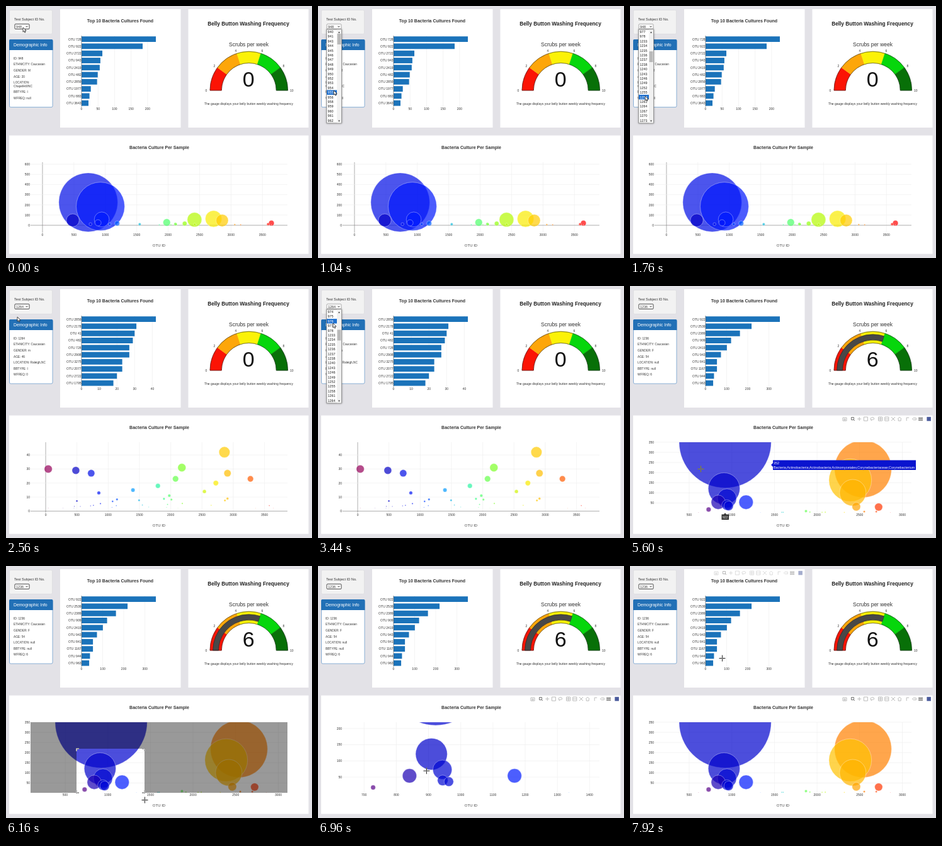
Recreate the animation shown at these times as an HTML page with a canvas. Size 486 by 400 pixels, loop 8000 ms.

```html
<!DOCTYPE html>
<html lang="en">
<head>
<meta charset="utf-8">
<title>Bacteria dashboard</title>
<style>
html, body { margin: 0; width: 100%; height: 100%; overflow: hidden; background: #e3e2e7; }
canvas { display: block; width: 486px; height: 400px; }
</style>
</head>
<body>
<canvas id="stage" width="486" height="400"></canvas>
<script>
const ctx = document.getElementById('stage').getContext('2d');
const LOOP = 8000;
const PLOT = { left: 39, right: 447, top: 248, bottom: 360 };
const BARS = { left: 120, top: 47, bottom: 160, longest: 118 };
const DRAG = { x: 112, y: 290, start: 5720, end: 6400 };
const RADIUS = 0.2078; // bubble radius per count

const lerp = (a, b, p) => a + (b - a) * p;
const clamp = (v, lo, hi) => Math.max(lo, Math.min(hi, v));
const smooth = p => p * p * (3 - 2 * p);
const random = n => Math.abs(Math.sin(n * 12.9898) * 43758.5453) % 1;
const range = (from, to, step = 1) => Array.from({ length: Math.floor((to - from) / step) + 1 }, (_, i) => from + i * step);

// Smallest of 1, 2, 5, 10... not below the given value
function niceStep(rough) {
  const power = 10 ** Math.floor(Math.log10(rough));
  return [1, 2, 5, 10].find(m => m * power >= rough) * power;
}

// Bubbles are {id, count}, largest first: the named cultures, then a scatter of rare ones between lo and hi.
function makeSample(id, wash, person, x, y, named, [lo, hi], rareCount, rareMax) {
  const rare = range(1, rareCount).map(i => ({
    id: i === 1 ? lo : i === 2 ? hi : lerp(lo, hi, random(i + rareCount)),
    count: 2 + rareMax * random(i * 7) ** 2
  }));
  const bubbles = named.split(' ').map(pair => {
    const [otu, count] = pair.split(':').map(Number);
    return { id: otu, count };
  }).concat(rare);
  const info = [`ID: ${id}`, 'ETHNICITY: Caucasian', ...person];
  return { id, wash, info, x, y, lo, hi, bubbles };
}

const samples = [
  makeSample('948', 0, ['GENDER: M', 'AGE: 20', 'LOCATION:\nChapelHill/NC', 'BBTYPE: I', 'WFREQ: null'],
    [-190, 3898], [-74, 619],
    '728:225 922:185 2722:63 943:57 2419:55 482:49 2859:47 1977:28 883:24 3643:21 1188:19 2263:17',
    [41, 3643], 18, 10),
  makeSample('1264', 0, ['GENDER: m', 'AGE: 46', 'LOCATION: Raleigh,NC', 'BBTYPE: I', 'WFREQ: 0'],
    [-242, 3867], [-1.2, 49.1],
    '2859:42 2178:31 41:30 482:29 728:27 2908:27 3275:23 2077:23 2722:20 1795:18 1396:15 2539:14 850:13 1977:11',
    [41, 3643], 28, 7),
  makeSample('1236', 6, ['GENDER: F', 'AGE: 54', 'LOCATION: null', 'BBTYPE: null', 'WFREQ: 6'],
    [94, 3107], [1.6, 350],
    '922:352 2539:218 2389:163 909:121 2419:101 943:73 841:54 1167:54 944:40 963:36 2460:32 2722:30 728:18 1870:10',
    [610, 2859], 12, 7)
];

const subjectIds = [
  ...range(940, 978).filter(id => ![942, 951, 957, 965].includes(id)),
  ...range(1233, 1238),
  ...range(1240, 1300, 3)
];

// Pointer keys: [time, x, y]
const pointerPath = [[0, 27, 34], [400, 27, 34], [1040, 25, 134], [1960, 24, 144], [2560, 18, 49], [2900, 25, 33],
  [4160, 22, 99], [4520, 22, 98], [5200, 112, 290], [DRAG.start, 112, 290], [6160, 220, 371],
  [DRAG.end, 220, 371], [7120, 165, 318], [7840, 146, 146]];

function pointerAt(t) {
  const next = pointerPath.findIndex(key => key[0] > t);
  if (next < 0) return pointerPath.at(-1).slice(1);
  const [a, b] = [pointerPath[next - 1], pointerPath[next]];
  const p = smooth((t - a[0]) / (b[0] - a[0]));
  return [lerp(a[1], b[1], p), lerp(a[2], b[2], p)];
}

function text(str, x, y, size, { color = '#333', align = 'left', bold = false } = {}) {
  ctx.font = `${bold ? 'bold ' : ''}${size}px "Liberation Sans", Arial, sans-serif`;
  ctx.fillStyle = color;
  ctx.textAlign = align;
  ctx.fillText(str, x, y);
}

function box(x, y, w, h, fill, stroke, radius = 0) {
  ctx.beginPath();
  ctx.roundRect(x, y, w, h, radius);
  if (fill) { ctx.fillStyle = fill; ctx.fill(); }
  if (stroke) { ctx.strokeStyle = stroke; ctx.lineWidth = 0.8; ctx.stroke(); }
}

function polyline(points, color, width = 0.6) {
  ctx.beginPath();
  points.forEach(([x, y]) => ctx.lineTo(x, y));
  ctx.strokeStyle = color;
  ctx.lineWidth = width;
  ctx.stroke();
}

function polygon(points, fill) {
  ctx.beginPath();
  points.forEach(([x, y]) => ctx.lineTo(x, y));
  ctx.fillStyle = fill;
  ctx.fill();
}

const line = (x1, y1, x2, y2, color, width) => polyline([[x1, y1], [x2, y2]], color, width);

function clipTo(x, y, w, h) {
  ctx.beginPath();
  ctx.rect(x, y, w, h);
  ctx.clip();
}

function drawSidebar({ info }) {
  box(5.5, 6.5, 68, 38, '#f2f2f2', '#dcdcdf', 2);
  text('Test Subject ID No.', 13, 23, 5.7);

  const lines = info.join('\n').split('\n').length;
  box(5.5, 53.5, 68.5, 101.5 + (lines - info.length) * 5.6, '#fff', '#6f9fce', 2);
  box(5, 53, 69.5, 17, '#2270b6', null, [2, 2, 0, 0]);
  text('Demographic Info', 12, 64.2, 6.8, { color: '#fff' });
  let y = 84.8;
  for (const entry of info) {
    entry.split('\n').forEach((part, i) => text(part, 12, y += i * 5.6, 4.75));
    y += 9.6;
  }
}

function drawSelect(value, open) {
  box(14, 28.7, 23, 7.8, '#fff', open ? '#999' : '#222', 1);
  text(value, 16, 34.6, 5.4);
  polyline([[31.5, 31.8], [33, 33.4], [34.5, 31.8]], '#222', 0.9);
}

function drawDropdown(top, pointerY) {
  const rowHeight = 7.4, firstRow = 41;
  ctx.save();
  ctx.shadowColor = 'rgba(0,0,0,.35)';
  ctx.shadowBlur = 3;
  box(13.5, 37, 24, 149, '#fff', '#888');
  ctx.restore();
  const hovered = Math.round((pointerY - firstRow) / rowHeight);
  for (let row = 0; row < 20; row++) {
    const y = firstRow + row * rowHeight;
    if (row === hovered) box(14, y - 3.7, 16, rowHeight, '#1e70cf');
    text(subjectIds[top + row], 15.5, y + 2, 5.4, { color: row === hovered ? '#fff' : '#222' });
  }
  box(30, 37.5, 7, 148, '#f1f1f1');
  box(30.6, 44 + top * 0.85, 5.8, 17, '#b9b9b9');
  text('▴', 33.5, 42.5, 5, { align: 'center' });
  text('▾', 33.5, 184, 5, { align: 'center' });
}

function drawBars({ bubbles }) {
  const { left, top, bottom, longest } = BARS;
  const max = bubbles[0].count, scale = longest / max, step = niceStep(max / 5);
  box(86, 5, 191.5, 188, '#fff');
  text('Top 10 Bacteria Cultures Found', 181.5, 26.3, 7, { align: 'center', bold: true });
  for (let v = 0; v <= max; v += step) {
    const x = left + v * scale;
    line(x, top, x, bottom, '#ececec');
    text(v, x, 165, 5, { align: 'center' });
  }
  bubbles.slice(0, 10).forEach(({ id, count }, i) => {
    const y = 52.7 + i * 11.27;
    box(left, y - 4.4, count * scale, 8.8, '#1b73ba');
    text('OTU ' + id, left - 0.4, y + 1.8, 5.1, { align: 'right' });
  });
  line(left, top, left, bottom, '#555');
}

const gauge = { x: 385.8, y: 134, inner: 43.5, outer: 61.8 };
const gaugeAngle = v => Math.PI * (1 + v / 10);

function ring(from, to, inner, outer, fill, stroke) {
  ctx.beginPath();
  ctx.arc(gauge.x, gauge.y, outer, gaugeAngle(from), gaugeAngle(to));
  ctx.arc(gauge.x, gauge.y, inner, gaugeAngle(to), gaugeAngle(from), true);
  ctx.closePath();
  if (fill) { ctx.fillStyle = fill; ctx.fill(); }
  ctx.strokeStyle = stroke;
  ctx.lineWidth = 0.6;
  ctx.stroke();
}

function drawGauge(value) {
  const { x, y, inner, outer } = gauge;
  const centered = { align: 'center' };
  box(289.5, 5, 191, 188, '#fff');
  text('Belly Button Washing Frequency', 385, 31, 8.3, { align: 'center', bold: true, color: '#222' });
  text('Scrubs per week', 385.5, 64, 8.45, centered);
  ['#fb1405', '#fda60a', '#fbf208', '#06d60c', '#087008'].forEach((color, i) => ring(i * 2, i * 2 + 2, inner, outer, color, color));
  if (value) ring(0, value, 48.2, 57.2, '#484848', '#222');
  ring(0, 10, inner, outer, null, '#222');
  for (const v of range(0, 10, 2)) {
    text(v, x + 68 * Math.cos(gaugeAngle(v)), y + 66 * Math.sin(gaugeAngle(v)) + 2, 5, centered);
  }
  text(value, x - 0.5, 127.7, 34, { align: 'center', color: '#111' });
  text('The gauge displays your belly button weekly washing frequency', 385.5, 157.3, 5, centered);
}

const rainbow = ['96005a', '0000c8', '0019ff', '0098ff', '2cff96', '97ff00', 'ffea00', 'ff6f00', 'ff0000']
  .map(hex => [0, 2, 4].map(i => parseInt(hex.slice(i, i + 2), 16)));

function rainbowColor(p) {
  const pos = clamp(p, 0, 1) * 8;
  const i = Math.min(7, Math.floor(pos));
  return `rgb(${rainbow[i].map((c, k) => Math.round(lerp(c, rainbow[i + 1][k], pos - i)))})`;
}

// The value ranges selected by the finished drag
function zoomRanges({ x, y }) {
  const { left, right, top, bottom } = PLOT;
  const xAt = px => lerp(x[0], x[1], (px - left) / (right - left));
  const yAt = py => lerp(y[0], y[1], (bottom - py) / (bottom - top));
  return { x: [xAt(DRAG.x), xAt(220)], y: [y[0], yAt(DRAG.y)] };
}

function ticks([lo, hi], count) {
  const step = niceStep((hi - lo) / count);
  return range(Math.max(0, Math.ceil(lo / step) * step), hi + 0.5, step);
}

function drawBubbles({ bubbles, lo, hi }, { x, y }) {
  const { left, right, top, bottom } = PLOT;
  const px = v => lerp(left, right, (v - x[0]) / (x[1] - x[0]));
  const py = v => lerp(bottom, top, (v - y[0]) / (y[1] - y[0]));

  box(5, 205.5, 475.5, 188, '#fff');
  text('Bacteria Culture Per Sample', 243.5, 226.5, 7.06, { align: 'center', bold: true });
  text('OTU ID', 243, 382, 6, { align: 'center', color: '#444' });
  for (const v of ticks(x, 9)) {
    line(px(v), top, px(v), bottom, v ? '#ececec' : '#777');
    text(v, px(v), 365, 5, { align: 'center' });
  }
  for (const v of ticks(y, 7.5)) {
    line(left, py(v), right, py(v), v ? '#ececec' : '#777');
    text(v, left - 1, py(v) + 1.8, 5, { align: 'right' });
  }

  ctx.save();
  clipTo(left, top, right - left, bottom - top);
  ctx.globalAlpha = 0.7;
  for (const { id, count } of bubbles) {
    ctx.beginPath();
    ctx.arc(px(id), py(count), count * RADIUS, 0, 7);
    ctx.fillStyle = rainbowColor((id - lo) / (hi - lo));
    ctx.fill();
    ctx.strokeStyle = '#fff';
    ctx.lineWidth = 0.5;
    ctx.stroke();
  }
  ctx.restore();
}

function drawHoverLabels() {
  const white = { color: '#fff' };
  ctx.save();
  clipTo(224, 276, 230, 16);
  box(227, 276.5, 227, 15.5, '#0a14cf');
  polygon([[227, 281], [224, 284], [227, 287]], '#0a14cf');
  text('352', 228, 283, 5.4, white);
  text('Bacteria;Actinobacteria;Actinobacteria;Actinomycetales;Corynebacteriaceae;Corynebacterium', 228, 290, 5.4, white);
  ctx.restore();

  box(145.5, 362.5, 11.5, 8.5, '#333');
  polygon([[149, 363], [151, 360], [153, 363]], '#333');
  text('922', 151.2, 368.8, 5.1, { color: '#fff', align: 'center' });
}

function drawZoomBox(x, y) {
  const right = clamp(x, DRAG.x, PLOT.right), bottom = clamp(y, DRAG.y, PLOT.bottom);
  ctx.fillStyle = 'rgba(0,0,0,.4)';
  ctx.beginPath();
  ctx.rect(PLOT.left, PLOT.top, PLOT.right - PLOT.left, PLOT.bottom - PLOT.top);
  ctx.rect(DRAG.x, DRAG.y, right - DRAG.x, bottom - DRAG.y);
  ctx.fill('evenodd');
  for (const [cx, dx] of [[DRAG.x, 4], [right, -4]]) {
    for (const [cy, dy] of [[DRAG.y, 4], [bottom, -4]]) {
      const corner = [[cx + dx, cy], [cx, cy], [cx, cy + dy]];
      polyline(corner, '#444', 2);
      polyline(corner, '#fff', 1.2);
    }
  }
}

// Toolbar icon outlines around their centres, in groups
const frameIcon = 'M-3-3H3V3H-3Z', plusIcon = 'M-3 0H3M0-3V3';
const iconGroups = [
  ['M-3-2H3V3H-3ZM-1 0H1V2H-1Z'],
  ['M-2.5-2.5H1.5V1.5H-2.5ZM1 1L3 3', plusIcon, frameIcon, 'M-2 1C-5-2 2-4 3-1S-1 1-2 1L-1 3'],
  [frameIcon + plusIcon, frameIcon + 'M-3 0H3', 'M-3-3L3 3M3-3L-3 3', 'M-3 0L0-3L3 0M-2 0V3H2V0'],
  ['M-2 3V-2H2', 'M-3 0L-1.5-1.5H3V1.5H-1.5Z', 'M-3-2H3V-.7H-3ZM-3 1H3V2.3H-3Z']
].map(group => group.map(path => new Path2D(path)));

function drawToolbar(x, y, alpha) {
  ctx.save();
  ctx.globalAlpha = alpha;
  ctx.translate(x, y);
  ctx.lineWidth = 1;
  for (const group of iconGroups) {
    for (const icon of group) {
      const active = icon === iconGroups[1][0] || icon === iconGroups[3][2];
      ctx.strokeStyle = active ? '#777' : '#bbb';
      ctx.stroke(icon);
      ctx.translate(10.2, 0);
    }
    ctx.translate(2.8, 0);
  }
  box(-3.2, -3.2, 6.5, 6.5, '#4a5a9c');
  ctx.restore();
}

const arrow = new Path2D('M0 0V7.2L1.7 5.7L2.8 8.2L4 7.6L2.9 5.2H5.2Z');
const beam = new Path2D('M-.5-1H2.5M1-1V6M-.5 6H2.5');
const cross = new Path2D('M-5 0H5M0-5V5');

function drawPointer(kind, x, y) {
  ctx.save();
  ctx.translate(x, y);
  ctx.lineWidth = 0.8;
  ctx.strokeStyle = '#222';
  if (kind === 'cross') {
    // The crosshair inverts what lies below it
    ctx.translate(0.5, 0.5);
    ctx.globalCompositeOperation = 'difference';
    ctx.strokeStyle = '#ddd';
    ctx.lineWidth = 1;
    ctx.stroke(cross);
  } else if (kind === 'text') {
    ctx.stroke(beam);
  } else {
    ctx.fillStyle = '#fff';
    ctx.fill(arrow);
    ctx.stroke(arrow);
  }
  ctx.restore();
}

function pointerKind(t, x, y) {
  if (t < 4320) return 'arrow';
  if (t < 4560) return 'text';
  const overPlot = y > PLOT.top && y < PLOT.bottom && x > PLOT.left;
  const overBars = x > BARS.left && x < 245 && y > BARS.top && y < BARS.bottom;
  const dragging = t >= DRAG.start && t < DRAG.end;
  return overPlot || overBars || dragging ? 'cross' : 'arrow';
}

function draw(t) {
  const [x, y] = pointerAt(t);
  const sample = samples[t < 2080 ? 0 : t < 4560 ? 1 : 2];
  const selected = samples[t < 1960 ? 0 : t < 4320 ? 1 : 2].id;
  const firstOpen = t >= 400 && t < 1960;
  const open = firstOpen || (t >= 2960 && t < 4320);
  const dragging = t >= DRAG.start && t < DRAG.end;
  const isZoomed = t >= DRAG.end && t < 7040;

  box(0, 0, 486, 400, '#e3e2e7');
  drawSidebar(sample);
  drawBars(sample);
  drawGauge(sample.wash);
  drawBubbles(sample, isZoomed ? zoomRanges(sample) : sample);

  if (t >= 5360 && t < DRAG.start) drawHoverLabels();
  if (dragging) drawZoomBox(x, y);
  if ((t >= 5040 && !dragging && !isZoomed) || t >= 6640) drawToolbar(341, 211, 1);
  if (t >= 7600) drawToolbar(137, 11, 0.5 * clamp((t - 7600) / 240, 0, 1));

  drawSelect(selected, open);
  if (open) drawDropdown(firstOpen ? Math.round(35 * clamp((t - 1240) / 560, 0, 1)) : 30, y);
  drawPointer(pointerKind(t, x, y), x, y);
}

let start;
function frame(now) {
  start ??= now;
  draw((now - start) % LOOP);
  requestAnimationFrame(frame);
}
requestAnimationFrame(frame);
</script>
</body>
</html>
```
